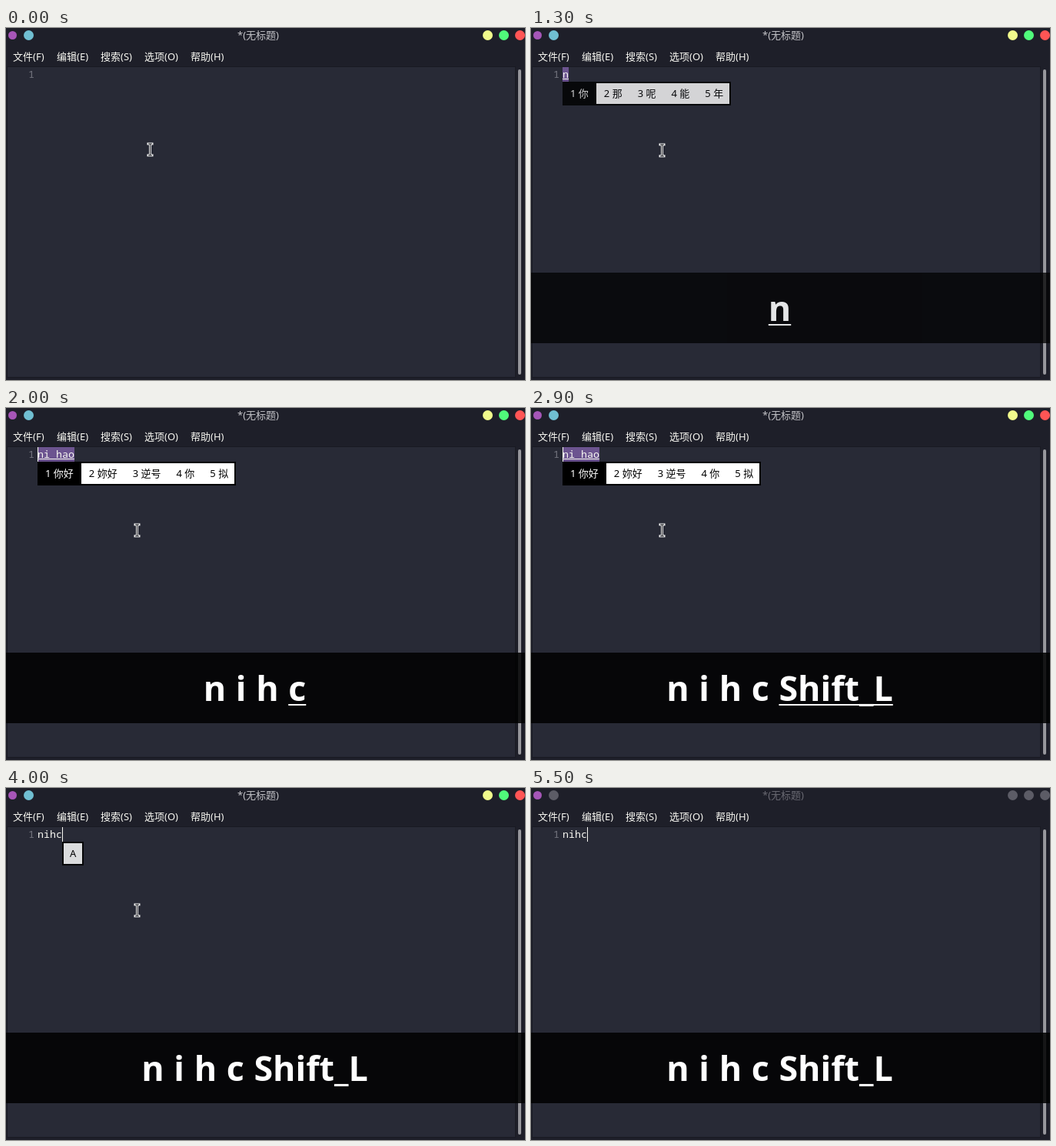
Write an HTML page that moves like this. It is 675x459 px and loops after 5600 ms.

```html
<!DOCTYPE html>
<html lang="zh-CN">
<head>
<meta charset="utf-8">
<title>Input method demo</title>
<style>
  html, body { margin: 0; width: 100%; height: 100%; overflow: hidden; background: #1e1f29; }
  body { position: relative; color: #f8f8f2; font: 13px/20px "Noto Sans", "Noto Sans CJK SC", "Noto Sans CJK", sans-serif; white-space: pre; }
  body div, body i, nav span { position: absolute; }
  i { border-radius: 50%; width: 13px; height: 13px; top: 3px; }
  #title { left: 228px; width: 200px; top: 0; line-height: 19px; text-align: center; color: #c5c5c9; }
  nav span { top: 27px; }
  #page { left: 2px; top: 51px; width: 660px; height: 404px; background: #282a36; box-shadow: 0 0 0 1px #191a22; }
  #thumb { left: 666px; top: 54px; width: 4px; height: 398px; border-radius: 2px; background: #97979c; }
  .mono { top: 51px; height: 19px; font: 13.333px/19px "Noto Sans Mono", "DejaVu Sans Mono", monospace; }
  #number { left: 29px; color: #74757f; }
  #line { left: 41px; }
  #line.preedit { background: #6c5490; text-decoration: underline 1px; text-decoration-skip-ink: none; }
  #caret { top: 51px; width: 1px; height: 19px; background: #f8f8f2; }
  #popup { top: 70px; height: 31px; display: flex; background: #000; line-height: 31px; }
  #popup span { padding: 0 10px; background: #fff; color: #000; border: solid #000; border-width: 2px 0; line-height: 27px; }
  #popup span:last-child { border-right-width: 2px; padding-right: 8px; }
  #popup span.active { background: #000; color: #fff; }
  #popup span.mode { border-width: 2px; padding: 0 8px; }
  #band { left: 0; top: 319px; width: 675px; height: 92px; background: rgba(0, 0, 0, .85); }
  #keys { left: 0; width: 647px; text-align: center; color: #fff; font: bold 44.8px/92px "Noto Sans", sans-serif; word-spacing: 1px; }
  #keys u { text-decoration: underline 2px; text-underline-offset: 4px; text-decoration-skip-ink: none; }
  svg { position: absolute; left: 0; top: 0; overflow: visible; }
  .unfocused i:not(#icon) { background: #5c5c66 !important; }
  .unfocused #title { color: #6a6a73; }
</style>
</head>
<body>
<i id="icon" style="left:3px;top:4px;width:11px;height:11px;background:#a656b8"></i>
<i style="left:23px;background:#70bfd2"></i>
<i style="left:620px;background:#f1fa8c"></i>
<i style="left:641px;background:#50fa7b"></i>
<i style="left:662px;background:#ff5555"></i>
<div id="title">*(无标题)</div>
<nav><span style="left:9px">文件(F)</span><span style="left:66px">编辑(E)</span><span style="left:123px">搜索(S)</span><span style="left:180px">选项(O)</span><span style="left:240px">帮助(H)</span></nav>
<div id="page"></div>
<div id="thumb"></div>
<div id="number" class="mono">1</div>
<div id="line" class="mono"></div>
<div id="caret"></div>
<div id="popup"></div>
<div id="band"><div id="keys"></div></div>
<svg width="1" height="1"><g id="pointer" fill="none">
  <path id="halo" stroke="#f4f4f4" stroke-width="3" stroke-linecap="square"/>
  <path id="core" stroke="#15161c" stroke-width="1"/>
</g></svg>
<script>
const LOOP = 5600, STEP = 100;
const IBEAM = 'M-2.5 -7.5H2.5M0 -7.5V7.5M-2.5 7.5H2.5';
const ARROW = 'M1.5 1.5V13.5L4.5 10.5L6.5 15L8.5 14L6.5 9.5H10.5Z';
const $ = id => document.getElementById(id);
const ramp = (t, start, length) => Math.min(1, Math.max(0, (t - start) / length));
const latest = (list, t) => list.filter(item => item[0] <= t).pop();

const lines = [[0, ''], [1100, 'n'], [1500, 'ni'], [1700, 'ni h'], [1900, 'ni hao'], [3000, 'nihc']];
const choices = [[0, ''], [1100, '你 那 呢 能 年'], [1500, '你 呢 泥 尼 拟'],
  [1700, '你会 你和 你还 你 拟'], [1900, '你好 妳好 逆号 你 拟'], [3000, 'A']];
// Each key stays underlined until the third value.
const keys = [[1100, 'n', 1400], [1500, 'i', 1700], [1700, 'h', 1900], [1900, 'c', 2200], [2900, 'Shift_L', 3100]];
const blinks = [300, 1100, 1500, 2300, 2700, 4100, 4500, 5300, 5500];
const trail = [[0, 187.5, 158.5], [100, 183.5, 158.5], [200, 174.5, 159.5], [300, 170.5, 159.5],
  [4700, 168.5, 152.5], [4800, 158.5, 122.5], [4900, 141.5, 83.5], [5000, 114, 43], [5100, 87, 9]];

function popupHtml(text) {
  if (text === 'A') return '<span class="mode">A</span>';
  return text && text.split(' ').map((word, i) =>
    `<span${i ? '' : ' class="active"'}>${i + 1} ${word}</span>`).join('');
}

function render(t) {
  const committed = t >= 3000;
  $('line').textContent = latest(lines, t)[1];
  $('line').className = committed ? 'mono' : 'mono preedit';
  $('caret').style.left = (committed ? 73 : 41) + 'px';
  $('caret').hidden = blinks.filter(time => time <= t).length % 2 === 0;

  $('popup').innerHTML = popupHtml(latest(choices, t)[1]);
  $('popup').style.left = (committed ? 73 : 41) + 'px';
  $('popup').style.opacity = ramp(t, 1180, 150) * (1 - ramp(t, 3950, 300));

  $('band').style.opacity = ramp(t, 1168, 150);
  $('keys').innerHTML = keys.filter(key => key[0] <= t)
    .map(([, name, until]) => t < until ? `<u>${name}</u>` : name).join(' ');

  const [, x, y] = latest(trail, t);
  const shape = y < 50 ? ARROW : IBEAM;
  $('halo').setAttribute('d', shape);
  $('core').setAttribute('d', shape);
  $('core').setAttribute('fill', y < 50 ? '#15161c' : 'none');
  $('pointer').setAttribute('transform', `translate(${x} ${y})`);
  $('pointer').style.display = t < 5200 ? '' : 'none';
  document.body.className = t >= 5500 ? 'unfocused' : '';
}

const start = performance.now();
let shown = -1;
function tick() {
  const t = Math.floor((performance.now() - start) % LOOP / STEP) * STEP;
  if (t !== shown) render(shown = t);
  requestAnimationFrame(tick);
}
tick();
</script>
</body>
</html>
```
